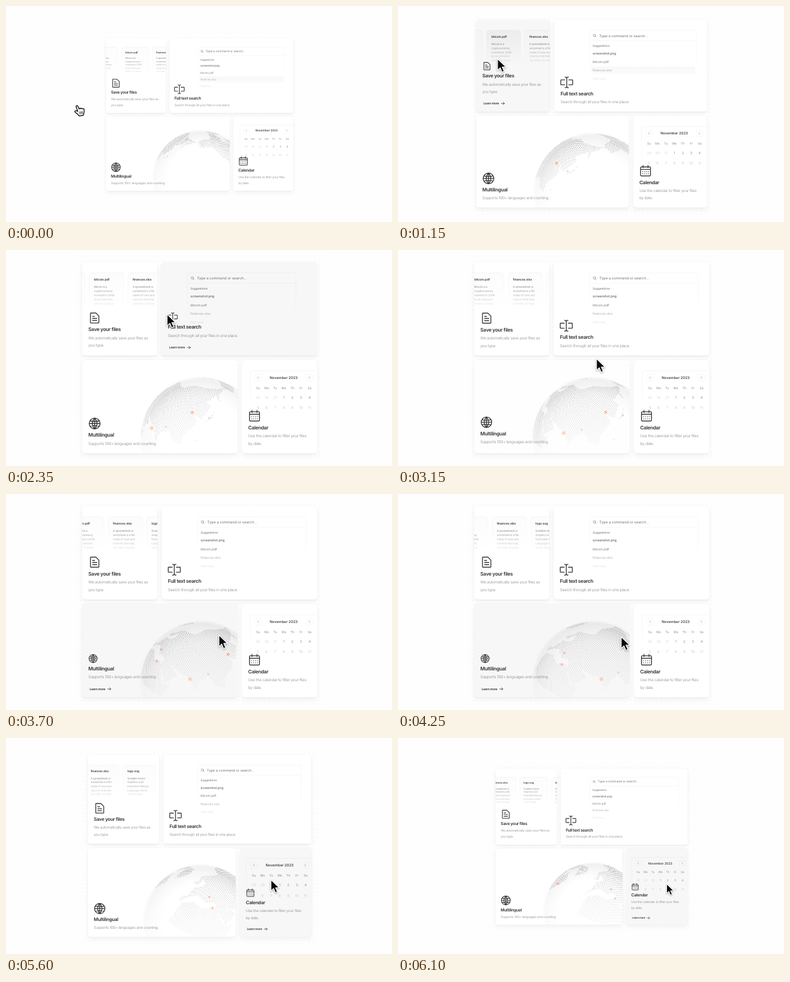
An HTML page with a canvas that plays this animation: 640 by 360 pixels, repeating every 6.15 s.

```html
<!DOCTYPE html>
<html lang="en">
<head>
<meta charset="utf-8">
<title>Bento grid</title>
<style>
html, body { margin: 0; width: 100%; height: 100%; overflow: hidden; background: #fefefe; }
#stage { position: absolute; left: 0; top: 0; width: 640px; height: 360px; overflow: hidden; }
#world { position: absolute; inset: 0; transform-origin: 320.8px 179.5px; }
#world > svg, #pointer { position: absolute; left: 0; top: 0; }
.card {
  position: absolute; overflow: hidden; border-radius: 5.2px; background: #fff;
  box-shadow: 0 0 0 .43px rgba(0,0,0,.03), 0 .9px 1.8px rgba(0,0,0,.05), 0 5px 10px rgba(0,0,0,.04);
}
.card svg, .card canvas { position: absolute; left: 0; top: 0; width: 100%; height: 100%; }
text { font-family: Inter, "Open Sans", sans-serif; white-space: pre; text-rendering: geometricPrecision; }
.tight { letter-spacing: -.04em; }
</style>
</head>
<body>
<div id="stage">
  <div id="world"></div>
  <svg id="pointer" width="640" height="360">
    <g id="arrow" style="filter:drop-shadow(0 1px 1.2px rgba(0,0,0,.35))">
      <path d="M0 0V17L4 13.2L6.7 19.6L9.7 18.3L7 12.1H12.4Z" fill="#0a0a0a" stroke="#fff" stroke-width="1.1" stroke-linejoin="round"/>
    </g>
    <g id="hand" style="filter:drop-shadow(0 .8px 1px rgba(0,0,0,.3))" stroke="#111" stroke-width="1.3" stroke-linejoin="round" stroke-linecap="round">
      <path fill="#fff" d="M5.2 9.6L2.8 3.3C2.2 1.2 4.8 .4 5.6 2.3L7.8 7C8 5.6 10.2 5.2 10.8 6.6C11.4 5.4 13.2 5.4 13.6 6.9C14.6 6 16 6.6 16 8.4C16.2 12 15.2 13.5 14.8 17.2L7.8 18.4C6 15.5 3 13.8 1 11.9C-.2 10.2 2 8.6 5.4 11Z"/>
      <path fill="none" stroke-width=".9" d="M8.6 11.6l.5 3.6M10.8 11.2l.5 3.6M13 10.9l.3 3.6"/>
    </g>
  </svg>
</div>
<script>
const LOOP = 6150;
const $ = id => document.getElementById(id);
const clamp = v => Math.max(0, Math.min(1, v));
const smooth = v => { v = clamp(v); return v * v * (3 - 2 * v); };

// cubic-bezier(.4, 0, .2, 1)
function ease(x) {
  x = clamp(x);
  let lo = 0, hi = 1;
  for (let i = 0; i < 18; i++) {
    const u = (lo + hi) / 2, v = 1 - u;
    if (1.2 * v * v * u + .6 * v * u * u + u ** 3 < x) lo = u; else hi = u;
  }
  return 3 * (1 - lo) * lo * lo + lo ** 3;
}

// ---------- markup helpers ----------
const text = (x, y, s, size, fill, attrs = '') =>
  `<text x="${x}" y="${y + size * .35}" font-size="${size}" fill="${fill}" ${attrs}>${s}</text>`;
const fade = (id, y1, y2) =>
  `<linearGradient id="${id}G" gradientUnits="userSpaceOnUse" x1="0" x2="0" y1="${y1}" y2="${y2}">
   <stop stop-color="#fff"/><stop offset="1" stop-color="#fff" stop-opacity="0"/></linearGradient>
   <mask id="${id}" maskUnits="userSpaceOnUse" x="0" y="0" width="640" height="360">
   <rect width="640" height="360" fill="url(#${id}G)"/></mask>`;
const line = (d, color, w) =>
  `<path d="${d}" fill="none" stroke="${color}" stroke-width="${w}" stroke-linecap="round" stroke-linejoin="round"/>`;

// ---------- file marquee ----------
const files = [
  ['seed.txt', 'A seed phrase,', 'seed recovery', 'phrase or backup', 'seed phrase is a', 'list of words'],
  ['bitcoin.pdf', 'Bitcoin is a', 'cryptocurrency', 'invented in 2008', 'by an unknown', 'person or group'],
  ['finances.xlsx', 'A spreadsheet or', 'worksheet is a file', 'made of rows and', 'columns that help', 'sort data, arrange'],
  ['logo.svg', 'Scalable Vector', 'Graphics is an', 'Extensible Markup', 'Language-based', 'vector image'],
  ['keys.gpg', 'GPG keys are used', 'to encrypt and', 'decrypt email,', 'files, directories', 'and whole disk']
];
const fileCard = ([name, ...body], i) => {
  const x = (i - 1) * 64;
  return `<g id="file${i}"><rect x="${x - 8}" y="38" width="57" height="72" rx="5" fill="#000" fill-opacity=".01" stroke="#000" stroke-opacity=".09" stroke-width=".5"/>` +
    text(x, 49, name, 5.3, '#111', 'font-weight="600" class="tight"') +
    body.map((s, k) => text(x, 61 + 7 * k, s, 4.6, '#3c3c3c', 'class="tight"')).join('') + '</g>';
};
const marquee = `<defs>${fade('fadeA', 36, 100)}</defs><g mask="url(#fadeA)"><g id="files">${files.map(fileCard).join('')}</g></g>`;

// ---------- search box ----------
const search = `<defs>${fade('fadeB', 60, 128)}</defs><g id="search"><g mask="url(#fadeB)">
  <rect x="318" y="38" width="180" height="110" rx="2.6" fill="#fff" fill-opacity=".3" stroke="#000" stroke-opacity=".08" stroke-width=".5"/>
  <path d="M318 55.6H498" stroke="#000" stroke-opacity=".08" stroke-width=".5"/>
  <rect id="picked" x="320" y="99.5" width="176" height="12.5" rx="1.5" fill="#eee"/>` +
  line('M328.1 46.5a2 2 0 1 0-4 0a2 2 0 1 0 4 0M327.6 48l1.6 1.6', '#777', .65) +
  text(334, 47, 'Type a command or search...', 6, '#717171') +
  text(323, 64.3, 'Suggestions', 4.8, '#707070', 'font-weight="500"') +
  ['screenshot.png', 'bitcoin.pdf', 'finances.xlsx', 'logo.svg']
    .map((s, i) => text(323, 77.5 + 14.1 * i, s, 5.6, '#111', 'letter-spacing="-.02em"')).join('') + '</g></g>';

// ---------- calendar ----------
const col = i => 417.5 + 14.25 * i;
const mid = 'text-anchor="middle"';
let month = '<rect x="404.7" y="201.3" width="118" height="110" rx="2.6" fill="none" stroke="#000" stroke-opacity=".1" stroke-width=".5"/>' +
  text(460, 212.8, 'November 2023', 6, '#111', mid + ' font-weight="500"');
for (const [x, dir] of [[417.5, 1], [502.5, -1]]) {
  month += `<rect x="${x - 5.5}" y="207.2" width="11" height="11" rx="2" fill="none" stroke="#ececec" stroke-width=".5"/>` +
    line(`M${x + .8 * dir} 211l${-1.7 * dir} 1.7l${1.7 * dir} 1.7`, '#777', .6);
}
['Su', 'Mo', 'Tu', 'We', 'Th', 'Fr', 'Sa'].forEach((d, i) => month += text(col(i), 230, d, 5.3, '#555', mid));
for (let n = 0; n < 14; n++) {
  const outside = n < 3;
  month += text(col(n % 7), n < 7 ? 245.6 : 263.2, outside ? 29 + n : n - 2, 5.8, outside ? '#aaa' : '#111', mid);
}
const calendar = `<defs>${fade('fadeD', 205, 279)}</defs><g id="month"><g mask="url(#fadeD)">${month}</g></g>`;

// ---------- cards ----------
const icons = {
  file: 'M3 1.5H9L12.5 5V13a.5.5 0 0 1-.5.5H3a.5.5 0 0 1-.5-.5V2a.5.5 0 0 1 .5-.5zM5 5.5H7.5M5 8H10M5 10.5H10',
  input: 'M5.5 1C6.9 1 7.5 1.6 7.5 2.6V12.4C7.5 13.4 6.9 14 5.5 14M9.5 1C8.1 1 7.5 1.6 7.5 2.6M9.5 14C8.1 14 7.5 13.4 7.5 12.4M5 4.5H.8a.5.5 0 0 0-.5.5v5a.5.5 0 0 0 .5.5H5M10 4.5h4.2a.5.5 0 0 1 .5.5v5a.5.5 0 0 1-.5.5H10',
  globe: 'M7.5 1a6.5 6.5 0 1 0 0 13a6.5 6.5 0 1 0 0-13zM1 7.5H14M7.5 1V14M7.5 1C3.8 5 3.8 10 7.5 14C11.2 10 11.2 5 7.5 1M2.2 4.3C5 5.4 10 5.4 12.8 4.3M2.2 10.7C5 9.6 10 9.6 12.8 10.7',
  calendar: 'M2.5 2.5H12.5a1 1 0 0 1 1 1V12.5a1 1 0 0 1-1 1H2.5a1 1 0 0 1-1-1V3.5a1 1 0 0 1 1-1zM1.5 5.5H13.5M4.5 .7V3.4M10.5 .7V3.4M4 8.4h.1M6.4 8.4h.1M8.7 8.4h.1M11 8.4h.1M4 10.9h.1M6.4 10.9h.1M8.7 10.9h.1M11 10.9h.1'
};
const cards = [
  { id: 'a', x: 126, y: 20, w: 125.4, icon: 'file', title: 'Save your files', body: ['We automatically save your files as', 'you type.'], art: marquee, on: 620, off: 2100 },
  { id: 'b', x: 258.3, y: 20, w: 257.7, icon: 'input', title: 'Full text search', body: ['Search through all your files in one place.'], art: search, on: 2115, off: 2800 },
  { id: 'c', x: 126, y: 183, w: 257.7, icon: 'globe', title: 'Multilingual', body: ['Supports 100+ languages and counting.'], art: '', on: 3090, off: 4400 },
  { id: 'd', x: 390.6, y: 183, w: 125.4, icon: 'calendar', title: 'Calendar', body: ['Use the calendar to filter your files', 'by date.'], art: calendar, on: 4450, off: 9000 }
];
const H = 156, LIFT = 17.4;

function cardHTML(c) {
  const left = c.x + 10.6, bottom = c.y + H, extra = (c.body.length - 1) * 12.6;
  c.left = left;
  c.iconY = bottom - 49.8 - extra;
  return `<div class="card" style="left:${c.x}px;top:${c.y}px;width:${c.w}px;height:${H}px">
    ${c.id === 'c' ? `<canvas id="globe" width="${Math.round(c.w * 2)}" height="${H * 2}"></canvas>` : ''}
    <svg viewBox="${c.x} ${c.y} ${c.w} ${H}">${c.art}
    <g id="${c.id}Text"><g id="${c.id}Icon">${line(icons[c.icon], '#383838', 1)}</g>` +
    text(left, bottom - 30.6 - extra, c.title, 8.24, '#333', 'font-weight="600" class="tight"') +
    c.body.map((s, i) => text(left, bottom - 16.6 - extra + 12.6 * i, s, 6.52, '#a0a0a0', 'class="tight"')).join('') +
    `</g><g id="${c.id}More">` + text(left + 1.9, bottom - 14, 'Learn more', 5.2, '#111', 'font-weight="500" class="tight"') +
    line(`M${left + 32} ${bottom - 14}h5.2m-2.2-2.2l2.2 2.2l-2.2 2.2`, '#111', .65) +
    `</g><rect id="${c.id}Tint" x="${c.x}" y="${c.y}" width="${c.w}" height="${H}" opacity="0"/></svg></div>`;
}

$('world').innerHTML = `<svg width="640" height="360"><defs>
  <pattern id="dots" x="123" y="16.5" width="6.93" height="6.93" patternUnits="userSpaceOnUse"><circle cx="1" cy="1" r=".45" fill="#b5b5b5"/></pattern></defs>
  <rect x="113" y="7" width="416" height="345" fill="url(#dots)" opacity=".35"/>
  <rect x="120" y="14" width="402" height="331" fill="url(#dots)" opacity=".5"/></svg>` + cards.map(cardHTML).join('');

// ---------- globe ----------
// Rough coastlines as lon, lat pairs.
const land = [
  [-9,37,-9,43,-1,44,8,54,20,55,28,60,23,65,17,60,12,56,5,60,25,71,68,69,105,77,140,73,190,66,163,60,156,51,155,59,136,54,140,48,
    127,35,118,39,122,31,109,20,107,10,98,12,91,22,80,15,77,8,72,20,57,26,48,30,59,22,45,13,35,28,36,36,24,37,13,45,3,43],
  [-17,14,-6,36,10,37,20,31,33,31,43,11,51,11,42,-2,9,4],
  [-168,66,-156,71,-125,72,-90,80,-65,82,-80,70,-95,60,-80,52,-77,62,-56,52,-81,30,-97,27,-88,15,-106,22,-124,41,-135,58,-160,56],
  [-70,78,-30,83,-20,72,-44,60],
  [131,32,141,36,145,44,139,38]
];
// Markers as lat, lon, size.
const markers = [[14.6, 121, .03], [19.1, 72.9, .1], [23.8, 90.4, .05], [30, 31.2, .07], [39.9, 116.4, .08],
  [42, -60, .08], [34.7, 135.5, .05], [41, 29, .06]];
const RAD = Math.PI / 180, TILT = .3, CX = 322.8, CY = 312.5, R = 100;

function inside(p, lon, lat) {
  let hit = false;
  for (let i = 0, j = p.length - 2; i < p.length; j = i, i += 2) {
    if (p[i + 1] > lat !== p[j + 1] > lat &&
        lon < (p[j] - p[i]) * (lat - p[i + 1]) / (p[j + 1] - p[i + 1]) + p[i]) hit = !hit;
  }
  return hit;
}
const spots = [], COUNT = 16000, GOLDEN = 180 * (3 - Math.sqrt(5));
for (let i = 0; i < COUNT; i++) {
  const lat = Math.asin(1 - 2 * (i + .5) / COUNT) / RAD;
  const lon = (i * GOLDEN + 180) % 360 - 180;
  if (land.some(p => inside(p, lon, lat) || inside(p, lon + 360, lat))) spots.push([lat, lon]);
}
function project(lat, lon, center, r) {
  const sin = Math.sin(lat * RAD), cos = Math.cos(lat * RAD), d = (lon - center) * RAD;
  const front = cos * Math.cos(d);
  return {
    x: CX + r * cos * Math.sin(d),
    y: CY - r * (sin * Math.cos(TILT) - front * Math.sin(TILT)),
    z: sin * Math.sin(TILT) + front * Math.cos(TILT)
  };
}
const ctx = $('globe').getContext('2d');
const rim = ctx.createRadialGradient(CX, CY, 0, CX, CY, R * 1.02);
[[0, 0], [.66, 0], [.84, .06], [.93, .1], [.965, .075], [1, 0]].forEach(([o, a]) => rim.addColorStop(o, `rgba(110,110,110,${a})`));
const veil = ctx.createLinearGradient(0, 215, 0, 342);
veil.addColorStop(0, '#000');
veil.addColorStop(1, 'rgba(0,0,0,.2)');

function drawGlobe(center) {
  ctx.setTransform(2, 0, 0, 2, -252, -366);
  ctx.clearRect(126, 183, 258, H);
  ctx.fillStyle = rim;
  ctx.fillRect(126, 183, 258, H);
  // Dots soften towards the limb.
  const near = new Path2D(), limb = new Path2D();
  for (const [lat, lon] of spots) {
    const p = project(lat, lon, center, R);
    if (p.z > .14 && p.x < 385 && p.y < 340) (p.z > .34 ? near : limb).rect(p.x - .44, p.y - .44, .88, .88);
  }
  ctx.fillStyle = 'rgba(70,70,70,.6)';
  ctx.fill(near);
  ctx.fillStyle = 'rgba(90,90,90,.36)';
  ctx.fill(limb);
  for (const [lat, lon, size] of markers) {
    const p = project(lat, lon, center, R * 1.07);
    if (p.z < .51) continue;
    for (const [k, a] of [[36, .35], [20, .5]]) {
      ctx.fillStyle = `rgba(251,100,50,${a})`;
      ctx.beginPath();
      ctx.arc(p.x, p.y, size * k, 0, 7);
      ctx.fill();
    }
  }
  ctx.globalCompositeOperation = 'destination-in';
  ctx.fillStyle = veil;
  ctx.fillRect(126, 183, 258, H);
  ctx.globalCompositeOperation = 'source-over';
}

// ---------- motion ----------
const spin = [[0, 200], [1150, 164.5], [2350, 126.5], [3150, 101.5], [4250, 65], [5050, 37], [6150, 0]];
const path = [[0, 118, 166], [620, 152, 112], [1150, 165, 88], [1700, 176, 92], [2100, 250, 104], [2350, 267, 107],
  [2750, 289, 128], [3150, 329, 181], [3700, 353, 235], [4250, 370, 238], [4500, 391, 235], [5050, 424, 228], [6150, 445.5, 243.3]];

const segment = (keys, t) => Math.max(0, keys.findLastIndex((k, i) => k[0] <= t && i < keys.length - 1));
function lerp(keys, t) {
  const i = segment(keys, t), [t0, a] = keys[i], [t1, b] = keys[i + 1];
  return a + (b - a) * (t - t0) / (t1 - t0);
}
function spline(keys, t, c) {
  const i = segment(keys, t), a = keys[i], b = keys[i + 1], span = b[0] - a[0];
  const slope = k => keys[k - 1] && keys[k + 1] ? (keys[k + 1][c] - keys[k - 1][c]) / (keys[k + 1][0] - keys[k - 1][0]) : 0;
  const u = (t - a[0]) / span, v = 1 - u;
  return a[c] * v * v * (1 + 2 * u) + b[c] * u * u * (3 - 2 * u) + span * u * v * (slope(i) * v - slope(i + 1) * u);
}
const move = (id, x, y, s = 1) => $(id).setAttribute('transform', `translate(${x} ${y}) scale(${s})`);

function render(t) {
  const zoom = .797 + .203 * (smooth((t - 250) / 1100) - smooth((t - 5276) / 1025));
  $('world').style.transform = `translateY(${8.5 * (1 - zoom)}px) scale(${zoom})`;

  const hover = {};
  for (const c of cards) {
    const h = hover[c.id] = ease((t - c.on) / 300) - ease((t - c.off) / 300);
    const k = 1.39 * (1 - .25 * h);
    move(c.id + 'Text', 0, -LIFT * h);
    move(c.id + 'Icon', c.left, c.iconY + 2.5 * h - 7.5 * k, k);
    move(c.id + 'More', 0, LIFT * (1 - h));
    $(c.id + 'More').setAttribute('opacity', h);
    $(c.id + 'Tint').setAttribute('opacity', .033 * h);
  }

  // The marquee pauses while the pointer rests on its card.
  const run = Math.min(t, 610) + Math.max(0, t - 2100);
  move('files', 166.8 - .0242 * run, 0);
  files.forEach((f, i) => {
    const sharp = i === 1 && t > 700 && t < 1950;
    $('file' + i).style.filter = sharp ? 'none' : 'blur(.35px)';
    $('file' + i).firstChild.setAttribute('fill-opacity', sharp ? .045 : .01);
  });

  move('search', -LIFT * hover.b, 0);
  $('picked').setAttribute('opacity', t < 2150 ? 1 : 0);
  const grow = 1 + .05 * hover.d;
  move('month', 460 * (1 - grow), 201 * (1 - grow), grow);
  drawGlobe(lerp(spin, t));

  const x = spline(path, t, 1), y = spline(path, t, 2), asHand = t < 250;
  $('hand').style.display = asHand ? '' : 'none';
  $('arrow').style.display = asHand ? 'none' : '';
  move('hand', x - 4.5, y - 1.2, zoom / .797);
  move('arrow', x, y, 1.15 * zoom);
}

const start = performance.now();
function tick() {
  render((performance.now() - start) % LOOP);
  requestAnimationFrame(tick);
}
tick();
</script>
</body>
</html>
```
